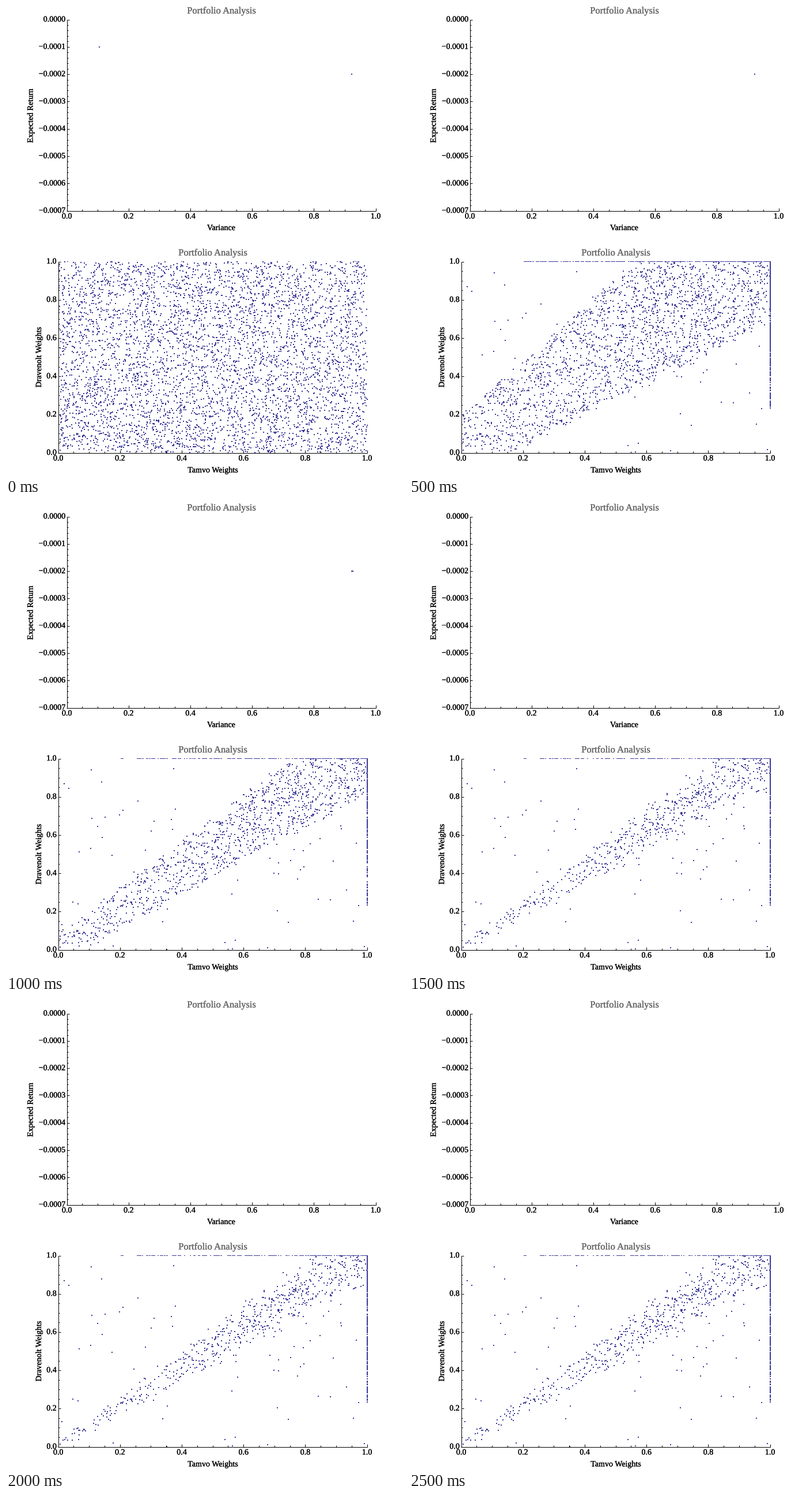
Recreate the animation shown at these times as a matplotlib script. Size 689x812 px, loop 3000 ms.

```python
import numpy as np
import matplotlib.pyplot as plt
from matplotlib.animation import FuncAnimation
from matplotlib.patches import Rectangle
from matplotlib.patheffects import withStroke

W, H, DPI = 689, 812, 64
PX = 72 / DPI  # points per pixel
DOT = "#3b3a98"
GREY = "#666666"

plt.rcParams["font.family"] = "Liberation Serif"
fig = plt.figure(figsize=(W / DPI, H / DPI), dpi=DPI, facecolor="white")
ax = fig.add_axes([0, 0, 1, 1])
ax.set_xlim(0, W)
ax.set_ylim(H, 0)
ax.axis("off")


def label(x, y, s, size=14, color="black", **kw):
    kw = {"ha": "center", "va": "baseline", **kw}
    weight = withStroke(linewidth=0.25 * PX, foreground=color)
    ax.text(x, y, s, fontsize=size * PX, color=color,
            path_effects=[weight], **kw)


def upright(x, y, s):
    label(x, y, s, rotation=90, rotation_mode="anchor")


def segment(x, y):
    ax.plot(x, y, color="black", lw=PX, solid_capstyle="butt", zorder=4)


def draw_axes(left, top, y_names, y_minor, width=536, height=331):
    """Axis lines with inward ticks; y_names run from top to bottom."""
    right, bottom = left + width, top + height
    segment([left, left], [top, bottom + 0.5])
    segment([left - 0.5, right + 0.5], [bottom, bottom])
    for i in range(21):
        x = left + width * i / 20
        major = i % 4 == 0
        segment([x, x], [bottom, bottom - (4.5 if major else 2.5)])
        if major:
            label(x, bottom + 13.5, f"{i / 20:.1f}")
    steps = (len(y_names) - 1) * y_minor
    for i in range(steps + 1):
        y = top + height * i / steps
        major = i % y_minor == 0
        segment([left, left + (4.5 if major else 2.5)], [y, y])
        if major:
            label(left - 3, y + 3.5, y_names[i // y_minor], ha="right")


def dots():
    return ax.plot([], [], "s", ms=2 * PX, mew=0, color=DOT, zorder=3)[0]


draw_axes(105.5, 23.5,
          ["0.0000"] + [f"\u22120.000{i}" for i in range(1, 8)], 5)
label(374, 13, "Portfolio Analysis", 16.5, GREY)
label(373.5, 388, "Variance")
upright(46.5, 190, "Expected Return")

draw_axes(90.5, 442.5, [f"{i / 5:.1f}" for i in range(5, -1, -1)], 4)
label(359, 432, "Portfolio Analysis", 16.5, GREY)
label(359, 807.5, "Tamvo Weights")
upright(61, 608, "Dravenolt Weights")

# Uniform cloud: a narrowing band keeps the points near the diagonal,
# a few sticky ones stay wherever they are.
rng = np.random.default_rng(11)
COUNT = 4900
px, py, blur, rank = rng.random((4, COUNT))
sticky = rng.random(COUNT) < 0.018
top_r, right_r = rng.random((2, 420))

# Lower and upper edge as (slope, offset), edge softness,
# number of points pushed onto the top and right borders
BANDS = [
    ((0.80, -0.14), (1.45, 0.20), 0.12, 400, 330),
    ((0.88, -0.08), (1.22, 0.09), 0.20, 250, 200),
    ((0.86, -0.03), (1.20, 0.04), 0.75, 230, 270),
]


def to_pixels(x, y):
    return np.round(91 + 536 * x), np.round(773 - 331 * y)


def weights(step):
    if step == 0:
        return to_pixels(px, py)
    low, high, soft, n_top, n_right = BANDS[min(step, 3) - 1]
    lo, hi = np.polyval(low, px), np.polyval(high, px)
    settle = 1 - 0.004 * max(step - 3, 0)
    reach = (hi - lo) / 2 * (1 - soft * blur) * settle
    inside = (np.abs(py - (lo + hi) / 2) < reach) & (rank < 0.65 + 0.5 * px)
    shown = inside | sticky
    along = 1 - 0.8 * top_r[:n_top] ** 1.2
    down = 1 - 0.77 * right_r[:n_right] ** 1.7
    return to_pixels(np.r_[px[shown], along, np.ones(n_right)],
                     np.r_[py[shown], np.ones(n_top), down])


RETURNS = [([162, 600], [71, 118]), ([600], [118]), ([600, 602], [118, 118])]

upper = dots()
lower = dots()
lower.set_clip_path(Rectangle((91, 442), 537, 332, transform=ax.transData))


def update(step):
    upper.set_data(*(RETURNS[step] if step < 3 else ([], [])))
    lower.set_data(*weights(step))
    return upper, lower


anim = FuncAnimation(fig, update, frames=6, interval=500, repeat=True,
                     repeat_delay=0, blit=False)
plt.show()
```
